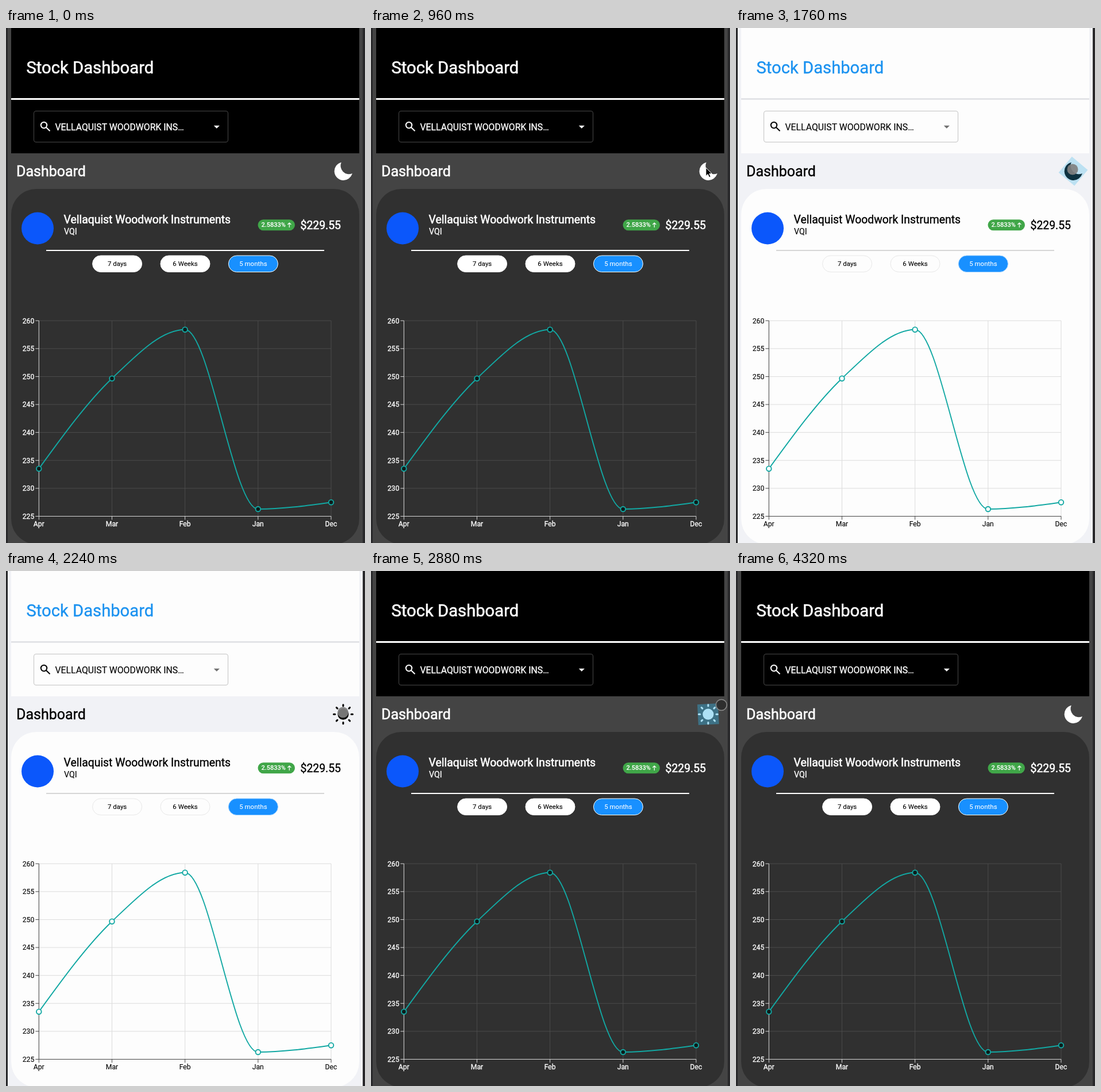
These frames come from a looping animation (625 by 896 pixels, 4400 ms). An HTML page:

```html
<!DOCTYPE html>
<html lang="en">
<head>
<meta charset="utf-8">
<title>Stock Dashboard</title>
<style>
html, body { margin: 0; width: 100%; height: 100%; overflow: hidden; background: #29292b; }
svg {
  display: block; width: 100%; height: 100%;
  font-family: Roboto, sans-serif;
  --page: #444; --panel: #000; --card: #303030; --text: #fff; --title: #fff;
  --rule: #fff; --divider: #fff; --field: #484848; --caret: #fff;
  --pill: #fff; --pillEdge: #fff; --activeEdge: #fff;
  --grid: #4b4b4b; --axis: #d6d6d6; --dot: #0d1c1b;
  --touch: rgba(42, 42, 42, .85); --touchEdge: #8c8c8c;
  --bold: .6; --regular: .3;
}
svg.light {
  --page: #f1f2f6; --panel: #fdfdfd; --card: #fdfdfd; --text: #000; --title: #1b92f0;
  --rule: #e3e4e7; --divider: #d6d6d6; --field: #c3c3c3; --caret: #707070;
  --pill: #fdfdfd; --pillEdge: #e8e8e8; --activeEdge: #8cc8ff;
  --grid: #dcdcdc; --axis: #444; --dot: #fdfdfd;
  --touch: rgba(128, 128, 128, .92); --touchEdge: none;
  --bold: .35; --regular: .1;
}
text { fill: var(--text); stroke: var(--text); stroke-width: var(--regular); }
.heading { stroke-width: var(--bold); }
.title { fill: var(--title); stroke: var(--title); }
.grid { fill: none; stroke: var(--grid); }
.axis { fill: none; stroke: var(--axis); }
.pill { fill: var(--pill); stroke: var(--pillEdge); }
.pill + text { fill: #000; stroke: #000; stroke-width: .1; }
.pill.active { fill: #1890ff; stroke: var(--activeEdge); }
.pill.active + text, .badge { fill: #fff; stroke: #fff; stroke-width: .1; }
</style>
</head>
<body>
<svg id="stage" viewBox="0 0 625 896" preserveAspectRatio="none">
  <rect x="3" width="618" height="896" fill="var(--page)"/>
  <rect x="9" width="606" height="218" fill="var(--panel)"/>
  <text class="heading title" x="35.5" y="79" font-size="29.2">Stock Dashboard</text>
  <rect x="9" y="122" width="606" height="3" fill="var(--rule)"/>

  <rect x="48.5" y="144.5" width="338" height="54" rx="3.5" fill="none" stroke="var(--field)"/>
  <g fill="none" stroke="var(--text)" stroke-width="2">
    <circle cx="66" cy="169" r="5.2"/>
    <path d="M70 173L76.5 179.3"/>
  </g>
  <text x="85.5" y="177.7" font-size="15.8">VELLAQUIST WOODWORK INS…</text>
  <path d="M361.7 169.7h10.2l-5.1 5z" fill="var(--caret)"/>

  <text class="heading" x="18" y="258" font-size="25">Dashboard</text>
  <rect x="9" y="280" width="606" height="618" rx="44" fill="var(--card)"/>
  <circle cx="55" cy="348.5" r="28" fill="#0b57fb"/>
  <text class="heading" x="100.5" y="339.7" font-size="19.4">Vellaquist Woodwork Instruments</text>
  <text x="101" y="359" font-size="14.2">VQI</text>
  <rect x="438.5" y="333.2" width="64.5" height="19" rx="9.5" fill="#40a648"/>
  <text class="badge" x="444.5" y="346.4" font-size="11" font-weight="500">2.5833%</text>
  <path d="M493.3 347V339M490.3 342l3-3 3 3" fill="none" stroke="#fff" stroke-width="1.2"/>
  <text class="heading" x="512.5" y="350" font-size="19.4">$229.55</text>
  <path d="M70 387H554" stroke="var(--divider)" stroke-width="1.8"/>

  <g id="pills" font-size="11.5" text-anchor="middle"></g>
  <g id="chart" font-size="12.2"></g>

  <g transform="translate(587 249.2)">
    <path id="moon" fill="var(--text)" d="M-3.2 -15.4A15.8 15.8 0 1 0 15.8 3.8A14.5 14.5 0 0 1 -3.2 -15.4Z"/>
    <g id="sun" fill="var(--text)" stroke="var(--text)" stroke-width="3" stroke-linecap="round">
      <circle r="8.1"/>
    </g>
    <rect id="tap" x="-18" y="-18" width="36" height="36" fill="rgb(51,181,229)"/>
  </g>
  <path id="arrow" d="M0 0V14.5L3.4 11.4 5.8 16.8 8.3 15.7 6 10.5H10.5Z" fill="#000" stroke="#fff"/>
  <circle id="touch" r="9.5" fill="var(--touch)" stroke="var(--touchEdge)" stroke-width="1.5"/>
</svg>
<script>
const LOOP = 4400, STEP = 80;
const el = id => document.getElementById(id);

function add(parent, tag, attrs, text) {
  const node = document.createElementNS('http://www.w3.org/2000/svg', tag);
  for (const key in attrs) node.setAttribute(key, attrs[key]);
  if (text) node.textContent = text;
  parent.append(node);
  return node;
}

['7 days', '6 Weeks', '5 months'].forEach((label, i) => {
  const x = 193.6 + i * 118.4;
  add(el('pills'), 'rect', { class: i === 2 ? 'pill active' : 'pill', x: x - 43, y: 396, width: 86, height: 28.5, rx: 14.25 });
  add(el('pills'), 'text', { x, y: 414.3 }, label);
});

// Monotone cubic interpolation over evenly spaced points
function monotonePath(points) {
  const dx = points[1][0] - points[0][0];
  const secant = points.slice(1).map((p, i) => (p[1] - points[i][1]) / dx);
  const last = secant.length;
  const slope = points.map((_, i) => {
    if (!i || i === last) return 0;
    const a = secant[i - 1], b = secant[i];
    return (Math.sign(a) + Math.sign(b)) * Math.min(Math.abs(a), Math.abs(b), Math.abs(a + b) / 4);
  });
  slope[0] = (3 * secant[0] - slope[1]) / 2;
  slope[last] = (3 * secant[last - 1] - slope[last - 1]) / 2;
  const h = dx / 3;
  return 'M' + points[0] + points.slice(1).map(([x, y], i) => {
    const [px, py] = points[i];
    return `C${px + h},${py + h * slope[i]} ${x - h},${y - h * slope[i + 1]} ${x},${y}`;
  }).join('');
}

function buildChart() {
  const chart = el('chart');
  const left = 57.3, right = 566, top = 509.2, bottom = 849.5;
  const months = ['Apr', 'Mar', 'Feb', 'Jan', 'Dec'];
  const heights = [766.7, 609.7, 524.7, 837, 825.2];
  const columns = months.map((_, i) => left + i * (right - left) / 4);
  const rows = Array.from({ length: 8 }, (_, i) => top + i * (bottom - top) / 7);
  const line = (cls, d) => add(chart, 'path', { class: cls, d });
  rows.forEach(y => line('grid', `M${left} ${y}H${right}`));
  columns.forEach(x => line('grid', `M${x} ${top}V${bottom}`));
  line('axis', `M${left} ${top}V${bottom}H${right}`);
  rows.forEach((y, i) => {
    line('axis', `M${left - 6} ${y}h6`);
    add(chart, 'text', { x: 49.3, y: y + 4.3, 'text-anchor': 'end' }, String(260 - i * 5));
  });
  columns.forEach((x, i) => {
    line('axis', `M${x} ${bottom}v6`);
    add(chart, 'text', { x, y: 867, 'text-anchor': 'middle' }, months[i]);
  });
  const points = columns.map((x, i) => [x, heights[i]]);
  const stroke = { stroke: '#12a8a3', 'stroke-width': 1.9 };
  add(chart, 'path', { d: monotonePath(points), fill: 'none', ...stroke });
  points.forEach(([cx, cy]) => add(chart, 'circle', { cx, cy, r: 4.3, fill: 'var(--dot)', ...stroke }));
}
buildChart();

for (let i = 0; i < 8; i++) {
  add(el('sun'), 'path', { d: 'M0 -14.2V-16.5', transform: `rotate(${i * 45})` });
}

// Each key is [time, value, ...]; values are interpolated linearly and held at the ends
function track(keys, t) {
  const next = keys.findIndex(k => k[0] > t);
  if (next < 0) return keys.at(-1).slice(1);
  if (next === 0) return keys[0].slice(1);
  const a = keys[next - 1], b = keys[next];
  const f = (t - a[0]) / (b[0] - a[0]);
  return a.slice(1).map((v, i) => v + (b[i + 1] - v) * f);
}

const arrowPath = [[640, 610, 256], [720, 583, 243]];
const touchPath = [
  [1520, 584, 244], [1680, 586, 246], [2080, 586, 246], [2560, 588, 246],
  [2800, 609, 224], [2880, 610, 233], [2960, 612, 243], [3120, 640, 250]
];
const tapGlow = [
  [1600, 0], [1680, .4], [1760, .28], [1840, 0],
  [2800, 0], [2880, .4], [2960, .2], [3040, 0]
];
const between = (t, from, to) => t >= from && t < to;
const show = (id, visible) => el(id).style.display = visible ? '' : 'none';
const moveTo = (id, [x, y]) => el(id).setAttribute('transform', `translate(${x} ${y})`);

function render(now) {
  const t = Math.floor(now % LOOP / STEP) * STEP;
  const sunny = between(t, 1840, 2960);
  el('stage').classList.toggle('light', between(t, 1760, 2880));
  show('sun', sunny);
  show('moon', !sunny);
  show('arrow', between(t, 640, 1520));
  show('touch', between(t, 1520, 3120));
  moveTo('arrow', track(arrowPath, t));
  moveTo('touch', track(touchPath, t));
  // The tap highlight follows the tilt of each icon
  el('tap').setAttribute('transform', `rotate(${sunny ? -3 : 40})`);
  el('tap').setAttribute('opacity', track(tapGlow, t)[0]);
}

const start = performance.now();
function tick() {
  render(performance.now() - start);
  requestAnimationFrame(tick);
}
tick();
</script>
</body>
</html>
```
